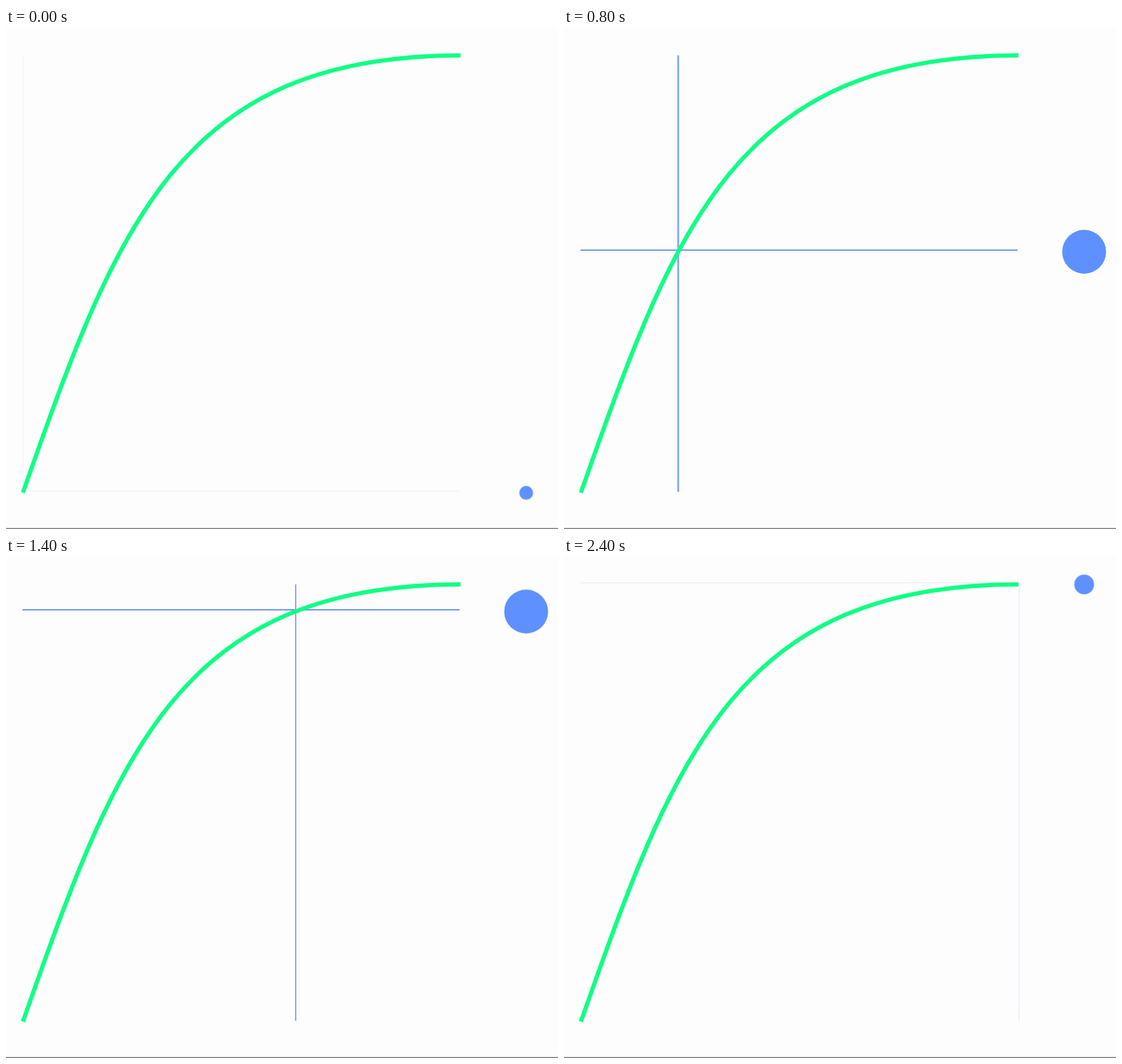
Write an HTML page that moves like this. It is 785 px wide and 713 px high and loops after 2.5 s.

```html
<!DOCTYPE html>
<html lang="en">
<head>
<meta charset="utf-8">
<title>Ease-out curve</title>
<style>
  html, body { margin: 0; width: 100%; height: 100%; overflow: hidden; background: #fefdfe; }
  svg { display: block; width: 785px; height: 713px; }

  /* Paused animations, positioned on the cycle by --t (ms). */
  .guides, .rise, .slide, .ball {
    animation: 2500ms linear calc(var(--t, 33.5) * -1ms) infinite paused;
  }
  .guides { animation-name: fade; stroke: #5f8fe9; stroke-width: 1.7; }
  .rise { animation-name: rise; }
  .slide { animation-name: slide; }
  .ball { animation-name: pop; transform-origin: 739.7px 661.5px; fill: #5e91ff; }
  .curve { fill: none; stroke: #10ff85; stroke-width: 6; }

  @keyframes fade {
    0%, 100% { opacity: 0; }
    20%, 80% { opacity: 1; }
  }
  @keyframes rise {
    0%, 20% { transform: translateY(0); animation-timing-function: cubic-bezier(.215, .61, .355, 1); }
    80%, 100% { transform: translateY(-622.5px); }
  }
  @keyframes slide {
    0%, 20% { transform: translateX(0); }
    80%, 100% { transform: translateX(622.8px); }
  }
  @keyframes pop {
    0% { transform: scale(0); animation-timing-function: cubic-bezier(.175, .885, .32, 1.275); }
    20% { transform: scale(1); }
    80% { transform: scale(1); animation-timing-function: cubic-bezier(.6, -.28, .735, .045); }
    100% { transform: scale(0); }
  }
</style>
</head>
<body>
<svg viewBox="0 0 785 713">
  <g class="guides">
    <path class="rise" d="M23.5 659.2H645"/>
    <path class="slide" d="M24.2 39V660"/>
  </g>
  <path class="curve" d="M24 661.3C157.8 281.8 244.9 39 646.4 39"/>
  <g class="rise"><circle class="ball" cx="739.7" cy="661.5" r="31.2"/></g>
  <rect y="711.7" width="785" height="1.3" fill="#707274"/>
</svg>
<script>
  const LOOP = 2500, STEP = 100, LEAD = 33.5;
  const root = document.documentElement;

  // The picture advances ten times a second; half a refresh of slack keeps steps on time.
  function draw() {
    const time = Math.floor((performance.now() + 8) / STEP) * STEP;
    root.style.setProperty('--t', (time + LEAD) % LOOP);
    requestAnimationFrame(draw);
  }
  draw();
</script>
</body>
</html>
```
